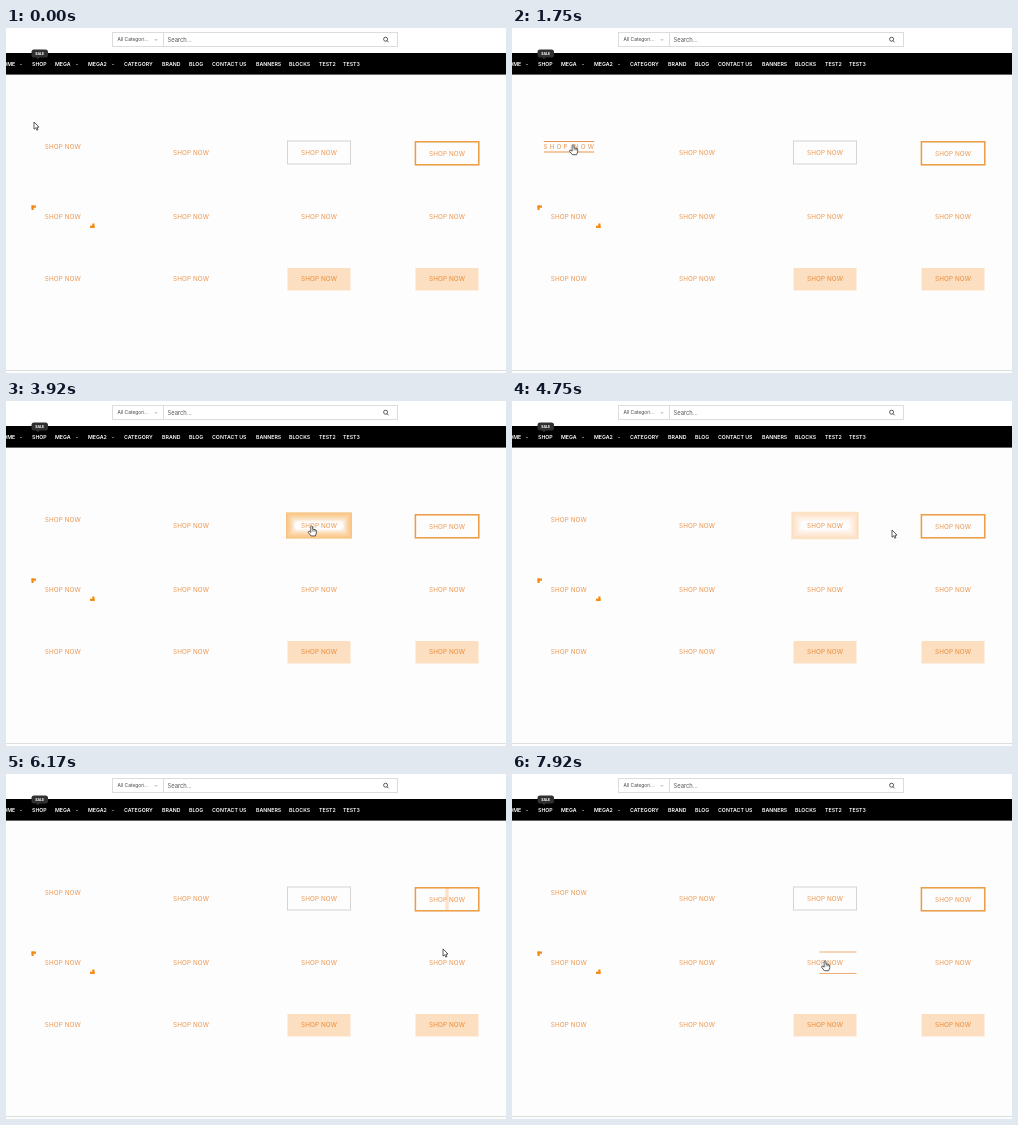
An HTML page with a canvas that plays this animation: 500x345 px, repeating every 8000 ms.

```html
<!DOCTYPE html>
<html lang="en">
<head>
<meta charset="utf-8">
<title>Button hover effects</title>
<style>
html, body { margin: 0; width: 100%; height: 100%; overflow: hidden; background: #fefdfe; }
canvas { display: block; width: 500px; height: 345px; }
</style>
</head>
<body>
<canvas id="stage"></canvas>
<script>
const W = 500, H = 345, LOOP = 8000, FPS = 12;
const ORANGE = '#ea964c', STRONG = '#f5890f', PALE = '#fde2c7';
const canvas = document.getElementById('stage');
const ctx = canvas.getContext('2d');
const dpr = window.devicePixelRatio || 1;
canvas.width = W * dpr;
canvas.height = H * dpr;

// Pointer path: time, x, y
const path = [
  [0, 28, 94], [350, 30, 96], [830, 48, 116], [1500, 60, 117], [1750, 61, 117],
  [2050, 80, 118], [2400, 160, 122], [2750, 190, 125], [3000, 212, 127], [3167, 226, 127],
  [3500, 275, 128], [3800, 300, 125], [4250, 322, 126], [4490, 346, 128], [4750, 380, 129],
  [5000, 412, 127], [5400, 440, 126], [5850, 441, 130], [5990, 440, 139], [6167, 437, 175],
  [6300, 437, 182], [7000, 438, 189], [7350, 411, 188], [7650, 346, 187],
  [7917, 313, 187], [8000, 312, 187]
];

// Hover start, end and transition length
const hovers = {
  spread: [800, 2080, 300],
  sweep: [2380, 3040, 340],
  glow: [3560, 4490, 1250],
  split: [5000, 5990, 205],
  fill: [6200, 7350, 300],
  rules: [7680, 9000, 423]
};

const clamp = v => Math.max(0, Math.min(1, v));
const smooth = v => v * v * (3 - 2 * v);
const expoOut = v => v >= 1 ? 1 : 1 - 2 ** (-10 * v);

function progress(name, t, ease = smooth) {
  const [start, end, len] = hovers[name];
  return t < end ? ease(clamp((t - start) / len)) : 1 - ease(clamp((t - end) / len));
}

function pointerAt(t) {
  const i = Math.max(1, path.findIndex(p => p[0] > t));
  const [t0, x0, y0] = path[i - 1], [t1, x1, y1] = path[i];
  const k = (t - t0) / (t1 - t0);
  return [x0 + (x1 - x0) * k, y0 + (y1 - y0) * k];
}

function rect(x, y, w, h, color) {
  ctx.fillStyle = color;
  ctx.fillRect(x, y, w, h);
}

function frame(x, y, w, h, color, line = 1) {
  ctx.strokeStyle = color;
  ctx.lineWidth = line;
  ctx.strokeRect(x, y, w, h);
}

function poly(points, fill, stroke, line = 0.8) {
  ctx.beginPath();
  points.forEach(([x, y]) => ctx.lineTo(x, y));
  ctx.closePath();
  if (fill) { ctx.fillStyle = fill; ctx.fill(); }
  if (stroke) { ctx.strokeStyle = stroke; ctx.lineWidth = line; ctx.stroke(); }
}

// y is the middle of the capitals
function text(str, x, y, size, { weight = 400, color = '#fff', align = 'left', gap = 0 } = {}) {
  ctx.font = `${weight} ${size}px Inter, sans-serif`;
  ctx.letterSpacing = gap + 'px';
  ctx.textAlign = align;
  ctx.fillStyle = color;
  ctx.fillText(str, x + (align === 'center' ? gap / 2 : 0), y + size * 0.364);
}

function label(x, y, color = ORANGE, extra = 0) {
  text('SHOP NOW', x, y, 6.3, { color, align: 'center', gap: 0.12 + extra });
}

function chevron(x, y, color, s = 1) {
  ctx.beginPath();
  ctx.moveTo(x - s, y - s / 2);
  ctx.lineTo(x, y + s / 2);
  ctx.lineTo(x + s, y - s / 2);
  ctx.strokeStyle = color;
  ctx.lineWidth = 0.7;
  ctx.stroke();
}

function header() {
  rect(0, 0, W, 25, '#fff');
  frame(106.5, 4.5, 285, 14, '#dcdcdf');
  rect(157, 5, 1, 13, '#dcdcdf');
  text('All Categori...', 111.5, 11.6, 4.9, { color: '#444' });
  chevron(150, 11.8, '#777');
  text('Search...', 161.5, 11.6, 5.8, { color: '#555' });
  ctx.beginPath();
  ctx.arc(379.6, 11.2, 2, 0, Math.PI * 2);
  ctx.moveTo(381, 12.7);
  ctx.lineTo(382.6, 14.3);
  ctx.strokeStyle = '#333';
  ctx.lineWidth = 0.8;
  ctx.stroke();

  rect(0, 25, W, 21.6, '#000');
  const nav = { weight: 600 };
  text('HOME', 9.3, 35.6, 5.25, { ...nav, align: 'right' });
  const items = [['SHOP', 26], ['MEGA', 49], ['MEGA2', 82], ['CATEGORY', 118], ['BRAND', 156],
    ['BLOG', 183], ['CONTACT US', 206], ['BANNERS', 250], ['BLOCKS', 283],
    ['TEST2', 313], ['TEST3', 337]];
  items.forEach(([name, x]) => text(name, x, 35.6, 5.25, nav));
  [15, 71, 107].forEach(x => chevron(x, 36.4, '#ccc', 0.9));

  ctx.beginPath();
  ctx.roundRect(25.5, 21.5, 16.5, 8, 2.5);
  ctx.fillStyle = '#303030';
  ctx.fill();
  poly([[30, 29], [34, 29], [32, 31.2]], '#303030');
  text('SALE', 33.7, 25.6, 3.5, { weight: 700, align: 'center' });
  rect(0, 342, W, 1, '#dededf');
}

function spreadButton(p) {
  if (p > 0) {
    const w = 50.5 * p;
    rect(57 - w / 2, 113, w, 1, ORANGE);
    rect(57 - w / 2, 123.5, w, 1, ORANGE);
  }
  label(56.7, 118.6, ORANGE, 2.05 * p);
}

function sweepButton(p) {
  const mid = 125 + 120 * p;
  ctx.save();
  ctx.beginPath();
  ctx.rect(154, 113, 62, 23);
  ctx.clip();
  poly([[mid - 3, 113], [mid + 20, 113], [mid + 3, 136], [mid - 20, 136]], PALE);
  ctx.restore();
  label(185, 124.6);
}

function glowButton(p) {
  const x = 281.5, y = 113, w = 63, h = 23, out = 7.5 * p;
  if (p > 0.005) {
    const grow = Math.min(out, 1.5), depth = 9;
    const layers = 9;
    ctx.save();
    ctx.globalAlpha = 0.11 * Math.min(1, p * 1.6);
    for (let i = 1; i <= layers; i++) {
      const d = depth * i / layers;
      ctx.beginPath();
      ctx.rect(x - grow, y - grow, w + 2 * grow, h + 2 * grow);
      ctx.roundRect(x - grow + d, y - grow + d, w + 2 * (grow - d), h + 2 * (grow - d), d / 2);
      ctx.fillStyle = '#f7a741';
      ctx.fill('evenodd');
    }
    ctx.restore();
  }
  ctx.save();
  ctx.globalAlpha = 1 - p;
  const mix = clamp(p * 5);
  const color = [[214, 250], [212, 222], [208, 182]].map(([a, b]) => a + (b - a) * mix);
  frame(x - out, y, w + 2 * out, h, 'transparent');
  frame(x - out, y - out, w + 2 * out, h + 2 * out, `rgb(${color})`);
  ctx.restore();
  label(313, 124.6);
}

function splitButton(p) {
  const w = 63 * p;
  rect(441 - w / 2, 114, w, 23, PALE);
  frame(409.4, 113.8, 63.4, 23, '#ec9b40', 1.5);
  label(441, 125.4);
}

function cornerButton() {
  rect(25.5, 177.5, 4.5, 2.2, STRONG);
  rect(25.5, 177.5, 2.2, 4.5, STRONG);
  rect(84, 197.7, 4.5, 2.2, STRONG);
  rect(86.3, 195.5, 2.2, 4.4, STRONG);
  label(56.7, 188.6);
}

function rulesButton(p) {
  const w = 63 * p;
  rect(344.5 - w, 177.5, w, 1, '#efb077');
  rect(344.5 - w, 199, w, 1, '#efb077');
  label(313, 188.6);
}

function fillButton(p) {
  ctx.globalAlpha = p;
  rect(411, 177.5, 61.5, 22.5, STRONG);
  ctx.globalAlpha = 1;
  label(441, 188.6);
  ctx.globalAlpha = p;
  label(441, 188.6, '#fbc98f');
  ctx.globalAlpha = 1;
}

function solidButton(x) {
  rect(x - 31.5, 240, 63, 22.5, '#fcdfc0');
  label(x, 251.2, '#e98a35');
}

function arrow(x, y) {
  poly([[0, 0], [0, 7.2], [1.7, 5.8], [2.8, 8.2], [4, 7.6], [2.9, 5.3], [5, 5.1]]
    .map(([a, b]) => [x + a, y + b]), '#fff', '#333');
}

function hand(x, y) {
  poly([[-0.9, 0.3], [0, -0.4], [0.9, 0.3], [1, 3], [2.3, 3], [3.4, 3.4], [4.6, 4.1],
    [4.7, 6.8], [3.6, 9.7], [-0.6, 9.7], [-3.4, 6.3], [-3.2, 5.2], [-2.2, 5.1], [-0.9, 6.2]]
    .map(([a, b]) => [x + a, y + b]), '#fff', '#333');
  ctx.beginPath();
  [1, 2.3, 3.5].forEach(a => {
    ctx.moveTo(x + a, y + 3.2);
    ctx.lineTo(x + a, y + 5.4);
  });
  ctx.lineWidth = 0.5;
  ctx.stroke();
}

function draw(t) {
  ctx.setTransform(dpr, 0, 0, dpr, 0, 0);
  rect(0, 0, W, H, '#fefdfe');
  header();
  spreadButton(progress('spread', t));
  sweepButton(progress('sweep', t));
  glowButton(progress('glow', t, expoOut));
  splitButton(progress('split', t));
  cornerButton();
  label(185, 188.6);
  rulesButton(progress('rules', t));
  fillButton(progress('fill', t));
  label(56.7, 251.2);
  label(185, 251.2);
  solidButton(313);
  solidButton(441);

  const [x, y] = pointerAt(t);
  const over = Object.values(hovers).some(([start, end]) => t >= start && t < end);
  (over ? hand : arrow)(x, y);
}

let begin;
function tick(now) {
  begin ??= now;
  const t = (now - begin) % LOOP;
  draw(Math.floor(t * FPS / 1000) * 1000 / FPS);
  requestAnimationFrame(tick);
}
draw(0);
requestAnimationFrame(tick);
</script>
</body>
</html>
```
